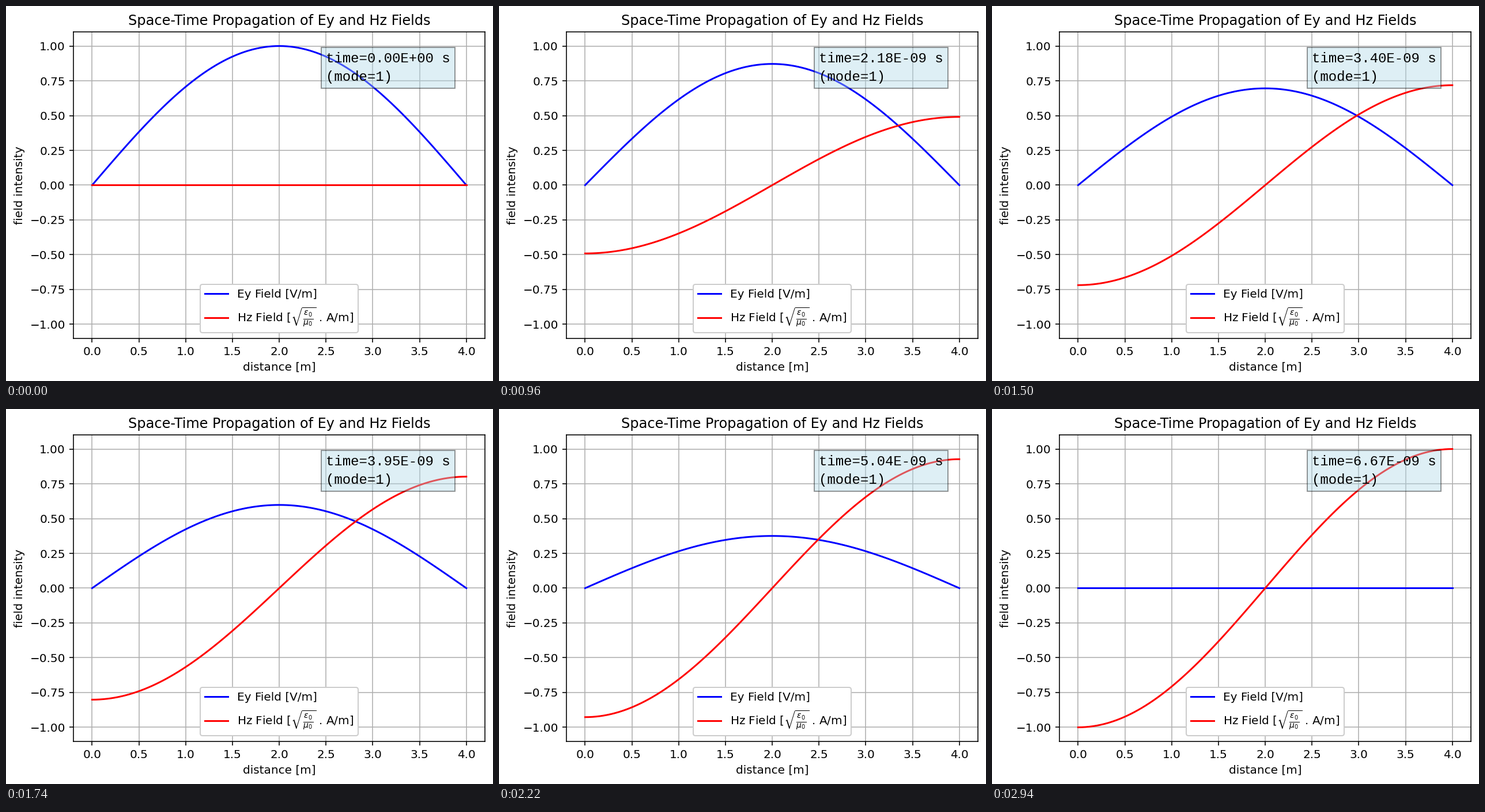
These frames come from a looping animation (845 px wide and 652 px high, 3 s). A matplotlib script:

```python
import numpy as np
import matplotlib.pyplot as plt
from matplotlib.animation import FuncAnimation

W, H, DPI = 845, 652, 144
FRAMES, INTERVAL = 50, 60
LENGTH, MODE = 4.0, 1
C = 299792458.0

plt.rcParams["font.family"] = "DejaVu Sans"

k = MODE * np.pi / LENGTH
omega = k * C
quarter = np.pi / 2 / omega
x = np.linspace(0, LENGTH, 101)

# The small surplus keeps the canvas size from rounding down.
fig = plt.figure(figsize=((W + 0.01) / DPI, (H + 0.01) / DPI), dpi=DPI,
                 facecolor="white")
ax = fig.add_axes([116.95 / W, 74.39 / H, 714.24 / W, 532.22 / H])
ax.set_xlim(-0.05 * LENGTH, 1.05 * LENGTH)
ax.set_ylim(-1.1, 1.1)
ax.set_xticks(np.arange(0, 4.1, 0.5))
ax.set_yticks(np.arange(-1, 1.1, 0.25))
ax.grid(True)
ax.set_title("Space-Time Propagation of Ey and Hz Fields")
ax.set_xlabel("distance [m]")
ax.set_ylabel("field intensity")

ey_line, = ax.plot([], [], color="blue", label="Ey Field [V/m]")
hz_line, = ax.plot(
    [], [], color="red",
    label=r"Hz Field [$\sqrt{\frac{\varepsilon_0}{\mu_0}}$ . A/m]")
ax.legend(loc="lower center", framealpha=1)

clock = ax.text(2.5, 0.75, "", fontsize=12, family="Liberation Mono",
                linespacing=1.5, bbox=dict(facecolor="lightblue", alpha=0.4))


def update(i):
    t = quarter * i / (FRAMES - 1)
    ey_line.set_data(x, np.cos(omega * t) * np.sin(k * x))
    hz_line.set_data(x, -np.sin(omega * t) * np.cos(k * x))
    clock.set_text(f"time={t:.2E} s\n(mode={MODE})")
    return ey_line, hz_line, clock


anim = FuncAnimation(fig, update, frames=FRAMES, interval=INTERVAL,
                     init_func=lambda: update(0), repeat=True, repeat_delay=0)
plt.show()
```
